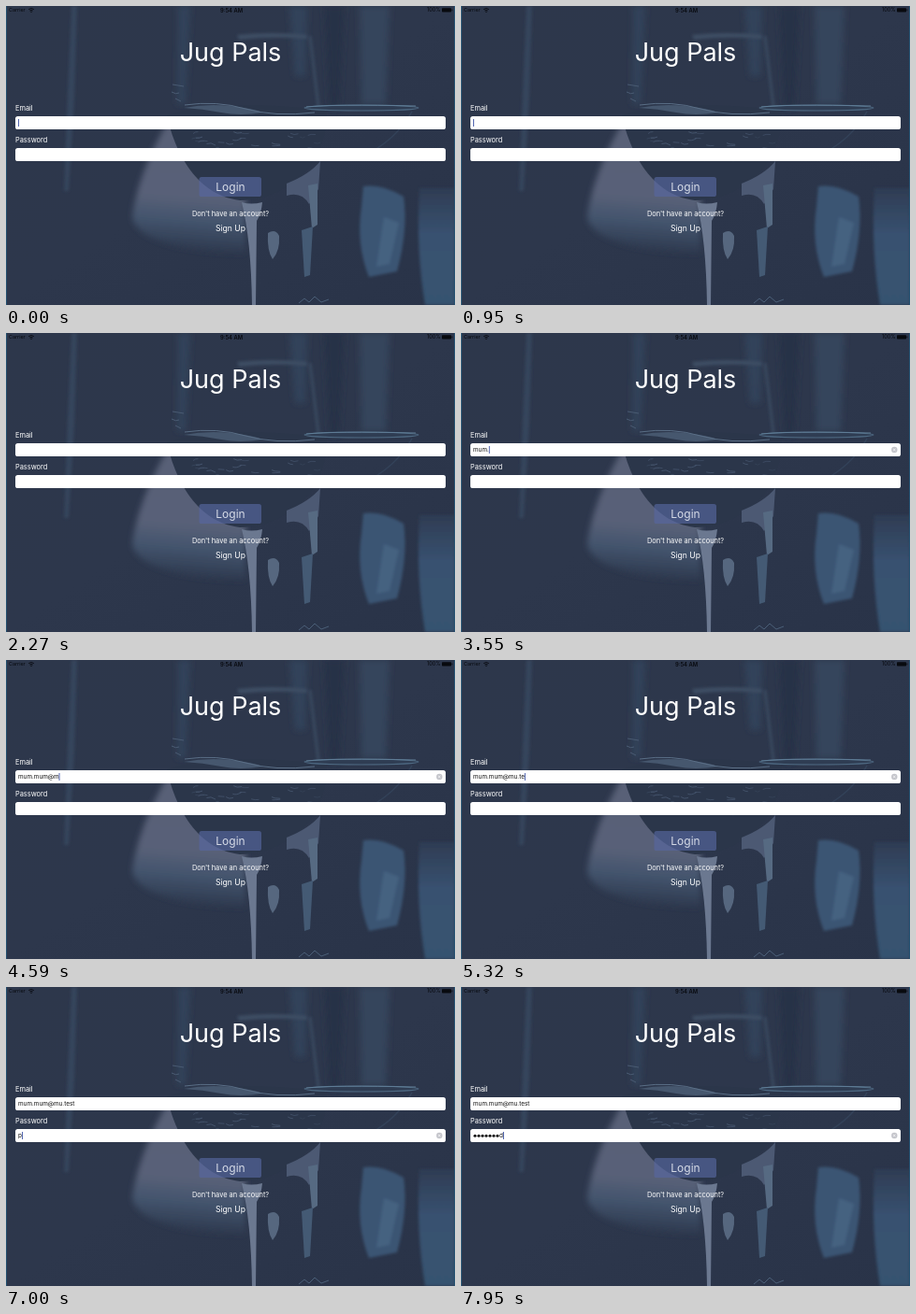
An HTML page for the animation above (8 s loop, 480 by 320 pixels).

```html
<!DOCTYPE html>
<html lang="en">
<head>
<meta charset="utf-8">
<title>Login</title>
<style>
  html, body { margin: 0; width: 100%; height: 100%; overflow: hidden; background: #2b3447; }
  svg { display: block; width: 480px; height: 320px; font-family: Inter, Roboto, sans-serif; }
  .mid { text-anchor: middle; }
  .crisp { filter: url(#crisp); }
  .soft { filter: url(#soft); }
  .haze { filter: url(#haze); }
</style>
</head>
<body>
<svg viewBox="0 0 480 320">
  <defs>
    <linearGradient id="base" x1="0" y1="0" x2="1" y2="1">
      <stop offset="0" stop-color="#2d374b"/>
      <stop offset=".5" stop-color="#2d374c"/>
      <stop offset="1" stop-color="#293348"/>
    </linearGradient>
    <linearGradient id="glow" gradientUnits="userSpaceOnUse" x1="185" y1="130" x2="175" y2="262">
      <stop offset="0" stop-color="#596177"/>
      <stop offset=".55" stop-color="#596178"/>
      <stop offset=".75" stop-color="#43546d"/>
      <stop offset="1" stop-color="#2c374c"/>
    </linearGradient>
    <linearGradient id="pane" x1="0" y1="0" x2="0" y2="1">
      <stop offset="0" stop-color="#2e3c53"/>
      <stop offset=".4" stop-color="#385170"/>
      <stop offset="1" stop-color="#365270"/>
    </linearGradient>
    <filter id="crisp"><feGaussianBlur stdDeviation=".5"/></filter>
    <filter id="soft" x="-50%" y="-20%" width="200%" height="140%"><feGaussianBlur stdDeviation="1.5"/></filter>
    <filter id="haze" x="-50%" y="-20%" width="200%" height="140%"><feGaussianBlur stdDeviation="3"/></filter>
    <clipPath id="bowl"><path d="M172 117C179 150 200 202 250 208C310 206 346 160 342 112Z"/></clipPath>
    <g id="clear">
      <circle r="3.2" fill="#c4c5cb"/>
      <path d="M-1.2-1.2L1.2 1.2M1.2-1.2L-1.2 1.2" stroke="#fff" stroke-width=".7"/>
    </g>
  </defs>

  <rect width="480" height="320" fill="url(#base)"/>

  <!-- blurred room behind the glasses -->
  <g class="haze">
    <path d="M184 0H197L192 105H183Z" fill="#33425a"/>
    <path d="M303 0H322L320 75H309Z" fill="#33435a"/>
    <path d="M340 0H362L356 110H346Z" fill="#283246"/>
    <path d="M378 0H410L406 105H380Z" fill="#35455c"/>
    <path d="M173 124C152 160 139 195 135 225C137 250 190 264 256 264V200Z" fill="url(#glow)"/>
  </g>
  <g class="soft">
    <path d="M70 0H76L73 100L67 198H62L66 90Z" fill="#35445b"/>
    <path d="M382 193Q402 190 425 204Q430 240 418 284L388 290Q374 255 380 215Z" fill="#3b5573"/>
    <path d="M404 226L420 232L410 276L396 279Z" fill="#456280"/>
    <path d="M442 195H480V320H448Q438 260 442 195Z" fill="url(#pane)"/>
    <path d="M247 31Q285 27 322 31L321 35Q285 32 249 36Z" fill="#3d4d63"/>
    <path d="M325 32L334 108" stroke="#38485f" stroke-width="3"/>
  </g>

  <!-- front glass -->
  <g class="crisp">
    <path d="M172 117C179 150 200 202 250 208C310 206 346 160 342 112C300 105 215 102 172 117Z" fill="#2b364a"/>
    <g id="ripples" clip-path="url(#bowl)" fill="none" stroke="#4b5b74"/>
    <path d="M300 190Q325 180 336 166L334 196L324 212Q316 198 300 203Z" fill="#4c5973"/>
    <path d="M190 109Q215 104 240 107T275 114Q250 118 230 114T190 109Z" fill="#46576e"/>
    <path d="M178 84L190 86M177 92Q182 95 185 93M181 99L187 102" stroke="#4a5b73" fill="none"/>
    <path d="M191 106Q225 101 256 110T330 114" fill="none" stroke="#5a6e86"/>
    <path d="M252 210Q262 213 274 210Q273 222 268 230L267 320H263Q262 250 252 210Z" fill="#6b7890"/>
    <path d="M280 243Q288 238 292 246Q293 262 285 271Q279 262 280 243Z" fill="#56677f"/>
    <path d="M323 192L333 190L333 234L327 238Z" fill="#566a82"/>
    <path d="M316 240L328 236L325 288L319 290Z" fill="#445a74"/>
    <path d="M313 318l6-5 5 4 6-6 7 6 8-3" fill="none" stroke="#4b5f78"/>
  </g>

  <!-- second glass -->
  <g class="crisp">
    <ellipse cx="380" cy="109" rx="61" ry="3" fill="#2f3d53" stroke="#4e6982" stroke-width="1.2"/>
    <path d="M321 108Q350 105 438 107" fill="none" stroke="#62809a" stroke-width=".9"/>
    <path d="M434 113Q416 145 382 160" fill="none" stroke="#334259" stroke-width="1.5"/>
  </g>
  <path d="M.5 0V320M479.5 0V320" stroke="#235070"/>

  <!-- status bar -->
  <g fill="#080a0f">
    <text x="3" y="6.4" font-size="5.4">Carrier</text>
    <path d="M24.2 3.6Q27 1.4 29.8 3.6M25.4 5Q27 3.8 28.6 5" fill="none" stroke="#080a0f" stroke-width=".9"/>
    <circle cx="27" cy="6.2" r=".7"/>
    <text class="mid" x="241" y="6.5" font-size="5.8" font-weight="600">9:54 AM</text>
    <text x="450" y="6.4" font-size="5.5">100%</text>
    <rect x="466" y="2.2" width="10" height="4.4" rx=".8"/>
    <rect x="476.5" y="3.5" width=".8" height="1.8"/>
  </g>

  <g fill="#fff">
    <text class="mid" x="240" y="59" font-size="27">Jug Pals</text>
    <text x="10" y="112" font-size="7.4">Email</text>
    <text x="10" y="146" font-size="7.4">Password</text>
    <rect x="10" y="118" width="460" height="14" rx="2.6"/>
    <rect x="10" y="152" width="460" height="14" rx="2.6"/>
    <text class="mid" x="240" y="224.5" font-size="7.4">Don't have an account?</text>
    <text class="mid" x="240" y="240.5" font-size="8.6">Sign Up</text>
  </g>
  <rect x="206.5" y="183" width="66.5" height="21" rx="2.6" fill="#5667a0" fill-opacity=".65"/>
  <text class="mid" x="240" y="198" font-size="12" fill="#d6dbe7">Login</text>

  <g font-size="6.4" fill="#111">
    <text id="email" x="13" y="127.2"></text>
    <g id="dots"></g>
    <text id="letter" y="161.2"></text>
  </g>
  <use id="clearIcon" href="#clear" x="463.3"/>
  <rect id="caret" width=".9" height="8" fill="#4056a8"/>
</svg>
<script>
  const LOOP = 8000, BLINK = 850;
  const EMAIL = { text: "mum.mum@mu.test", start: 2800, step: 205 };
  const PASSWORD = { text: "password", start: 6980, step: 132 };
  const FOCUS_PASSWORD = 6350, DOT_PITCH = 4;
  const $ = id => document.getElementById(id);
  const [email, dots, letter, clearIcon, caret] =
    ["email", "dots", "letter", "clearIcon", "caret"].map($);

  dots.innerHTML = [...PASSWORD.text].map((_, i) =>
    `<circle cx="${15 + i * DOT_PITCH}" cy="159.2" r="1.55"/>`).join("");

  // Scattered glints in the drink.
  let seed = 7;
  const random = () => (seed = seed * 16807 % 2147483647) / 2147483647;
  $("ripples").innerHTML = Array.from({ length: 45 }, () => {
    const x = 195 + random() * 135, y = 132 + random() * 34;
    return `<path d="M${x} ${y}q${2 + random() * 4} ${random() * 6 - 3} ${5 + random() * 5} ${random() * 4 - 2}"
      opacity="${0.25 + random() * 0.6}"/>`;
  }).join("");

  const typedCount = ({ text, start, step }, t) =>
    Math.max(0, Math.min(text.length, Math.floor((t - start) / step) + 1));

  // The caret stays solid while typing and blinks when idle.
  function caretVisible(field, focusTime, t) {
    const lastKey = field.start + (field.text.length - 1) * field.step;
    if (t >= field.start && t <= lastKey) return true;
    const since = t - (t > lastKey ? lastKey : focusTime);
    return since % BLINK < BLINK / 2;
  }

  function draw(t) {
    const onPassword = t >= FOCUS_PASSWORD;
    const field = onPassword ? PASSWORD : EMAIL;
    const emailCount = typedCount(EMAIL, t);
    const passCount = typedCount(PASSWORD, t);

    email.textContent = EMAIL.text.slice(0, emailCount);
    [...dots.children].forEach((dot, i) =>
      dot.setAttribute("visibility", i < passCount - 1 ? "visible" : "hidden"));
    letter.textContent = passCount ? PASSWORD.text[passCount - 1] : "";
    letter.setAttribute("x", 13 + (passCount - 1) * DOT_PITCH);

    const rowY = onPassword ? 159 : 125;
    const textWidth = onPassword ? passCount * DOT_PITCH
      : emailCount ? email.getComputedTextLength() : 0;
    caret.setAttribute("x", 13 + textWidth);
    caret.setAttribute("y", rowY - 4);
    caret.setAttribute("visibility",
      caretVisible(field, onPassword ? FOCUS_PASSWORD : 0, t) ? "visible" : "hidden");
    clearIcon.setAttribute("y", rowY);
    clearIcon.setAttribute("visibility",
      (onPassword ? passCount : emailCount) ? "visible" : "hidden");
  }

  function tick() {
    draw(performance.now() % LOOP);
    requestAnimationFrame(tick);
  }
  tick();
</script>
</body>
</html>
```
